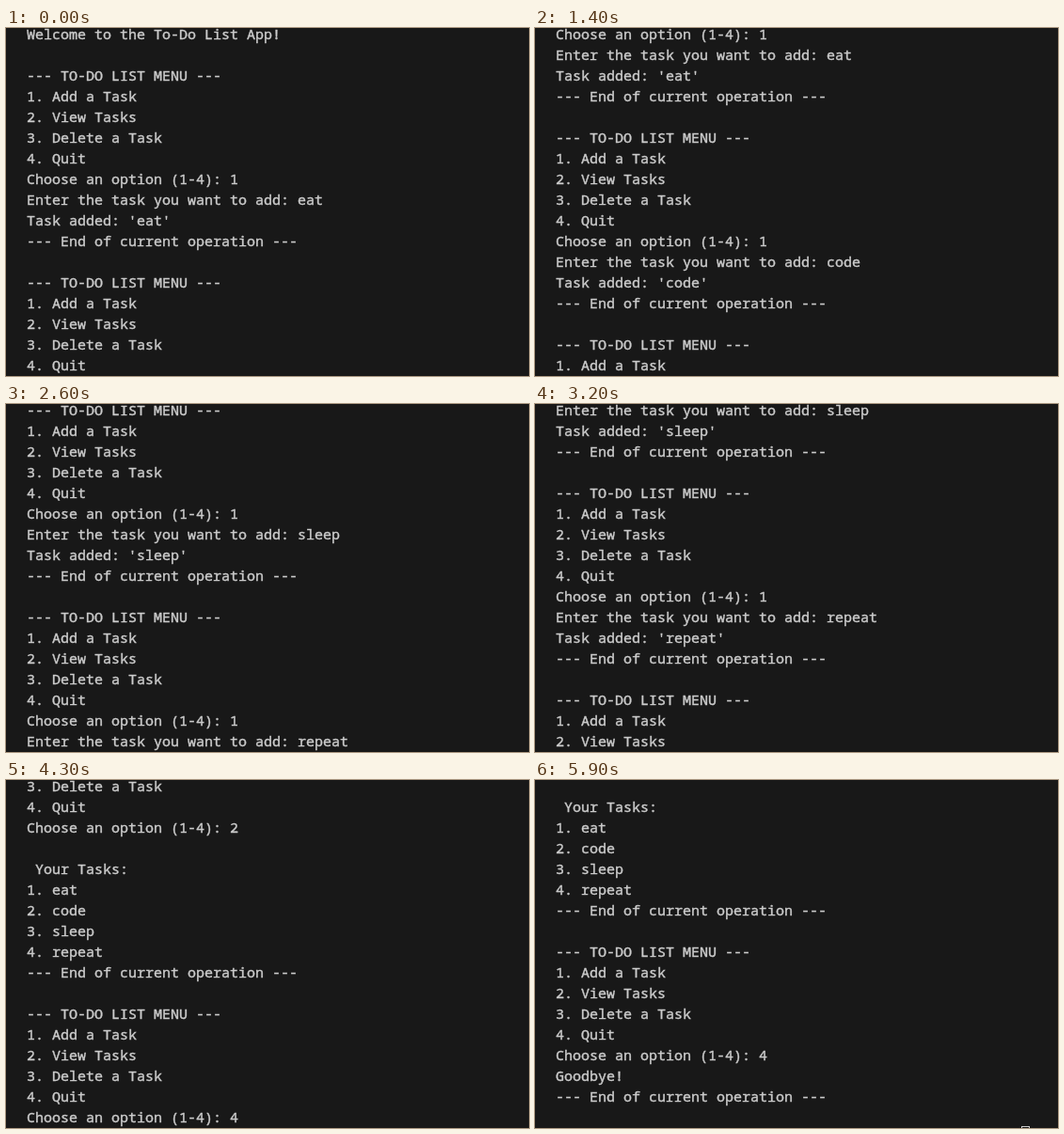
Recreate the animation shown at these times as an HTML page with a canvas. Size 556 by 370 pixels, loop 6000 ms.

```html
<!DOCTYPE html>
<html lang="en">
<head>
<meta charset="utf-8">
<title>To-Do List terminal</title>
<style>
  html, body { margin: 0; overflow: hidden; background: #181818; }
  canvas { display: block; }
</style>
</head>
<body>
<canvas id="screen" width="556" height="370"></canvas>
<script>
const ctx = document.getElementById('screen').getContext('2d');
const LOOP = 6000, STEP = 100;
const ROW = 22, CHAR = 9, LEFT = 22, BASELINE = 12, VISIBLE_ROWS = 17;

const tasks = ['eat', 'code', 'sleep', 'repeat'];
const end = '--- End of current operation ---';
const menu = choice => [
  '', '--- TO-DO LIST MENU ---',
  '1. Add a Task', '2. View Tasks', '3. Delete a Task', '4. Quit',
  `Choose an option (1-4): ${choice}`
];
const lines = [
  'Welcome to the To-Do List App!',
  ...tasks.flatMap(task => [
    ...menu(1), `Enter the task you want to add: ${task}`, `Task added: '${task}'`, end
  ]),
  ...menu(2), '', ' Your Tasks:', ...tasks.map((task, i) => `${i + 1}. ${task}`), end,
  ...menu(4), 'Goodbye!', end
];
const cursor = { row: lines.length + 1, col: 55 };

// Scroll moves and the pauses between them, in ms and lines
const moves = [
  { until: 800, to: 5 }, { until: 1300, to: 5 },
  { until: 1800, to: 17 }, { until: 2600, to: 22 },
  { until: 3200, to: 28 }, { until: 3400, to: 28 },
  { until: 4300, to: 45 }, { until: 4800, to: 45 },
  { until: 4900, to: 48 }
];

function topLine(time) {
  let start = 0, from = 0;
  for (const { until, to } of moves) {
    if (time < until) return Math.round(from + (to - from) * (time - start) / (until - start));
    start = until;
    from = to;
  }
  return from;
}

function draw(time) {
  const top = topLine(Math.floor(time / STEP) * STEP);
  ctx.fillStyle = '#181818';
  ctx.fillRect(0, 0, 556, 370);
  ctx.fillStyle = ctx.strokeStyle = '#cccccc';
  ctx.font = '15px "Noto Sans Mono", monospace';
  ctx.lineWidth = 0.4;
  lines.slice(top, top + VISIBLE_ROWS).forEach((line, i) => {
    const y = BASELINE + i * ROW;
    ctx.fillText(line, LEFT, y);
    ctx.strokeText(line, LEFT, y);
  });
  ctx.lineWidth = 1;
  ctx.strokeRect(LEFT + cursor.col * CHAR + 0.5, (cursor.row - top) * ROW - 5.5, CHAR - 1, ROW - 3);
}

const began = performance.now();
function tick() {
  draw((performance.now() - began) % LOOP);
  requestAnimationFrame(tick);
}
tick();
</script>
</body>
</html>
```
